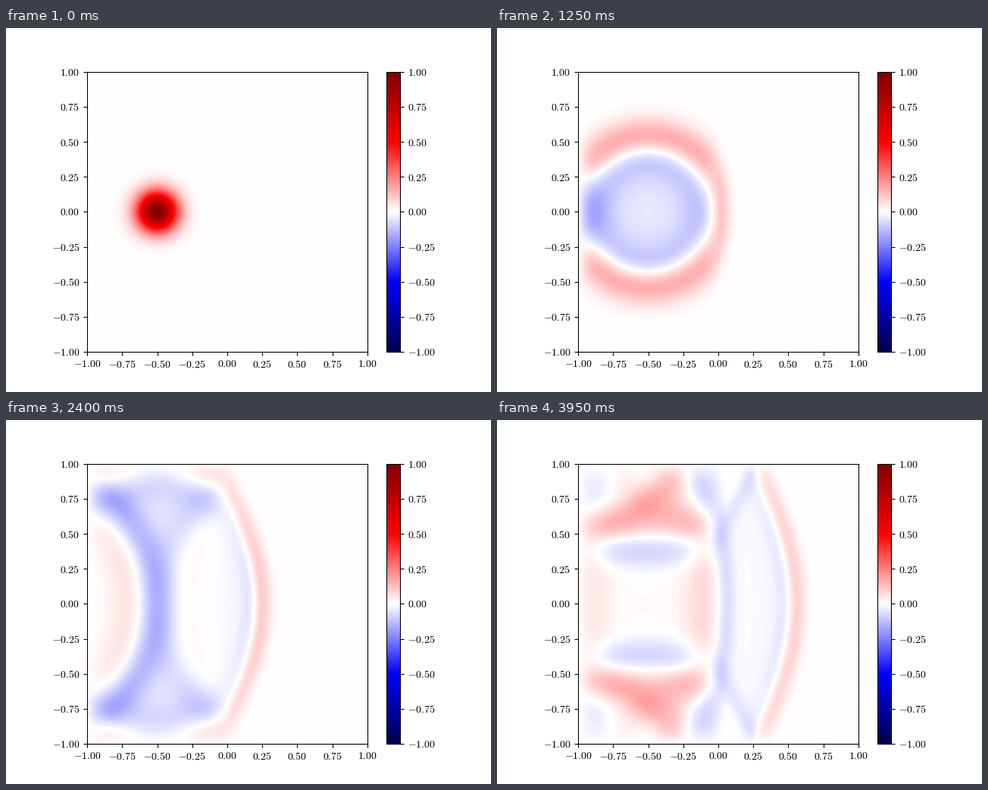
Animation of 640x480 px, one loop 4000 ms. Source, as a matplotlib script:

```python
import numpy as np
import matplotlib.pyplot as plt
from matplotlib.animation import FuncAnimation

plt.rcParams.update({
    "mathtext.fontset": "cm",
    "font.family": "Liberation Serif",
    "font.size": 10,
})

FRAMES = 80
INTERVAL = 50       # ms
N = 201             # grid nodes per side
SUBSTEPS = 4
DT = 0.02 / SUBSTEPS

axis = np.linspace(-1, 1, N)
h = axis[1] - axis[0]
X, Y = np.meshgrid(axis, axis)

# Wave speed 1 on the left, 1/2 on the right; averaged on the interface.
speed2 = np.where(X < -h / 2, 1.0, np.where(X > h / 2, 0.25, 0.4))
coef = (speed2 * (DT / h) ** 2)[1:-1, 1:-1]


def push(u):
    """Return dt^2 c^2 laplacian(u), zero on the fixed boundary."""
    out = np.zeros_like(u)
    out[1:-1, 1:-1] = coef * (
        u[2:, 1:-1] + u[:-2, 1:-1] + u[1:-1, 2:] + u[1:-1, :-2]
        - 4 * u[1:-1, 1:-1]
    )
    return out


def solve():
    """Leapfrog solution of the wave equation, one field per frame."""
    u = np.exp(-50 * ((X + 0.5) ** 2 + Y ** 2))
    u[[0, -1], :] = 0
    u[:, [0, -1]] = 0
    prev = u + push(u) / 2      # starts at rest
    fields = [u]
    for _ in range(FRAMES - 1):
        for _ in range(SUBSTEPS):
            u, prev = 2 * u - prev + push(u), u
        fields.append(u)
    return fields


def label(value, _):
    return f"${round(value, 2) + 0.0:.2f}$"


fields = solve()

fig, ax = plt.subplots(figsize=(6.4, 4.8), dpi=100)
edge = 1 + h / 2
image = ax.imshow(fields[0], origin="lower", cmap="seismic", vmin=-1, vmax=1,
                  extent=(-edge, edge, -edge, edge), interpolation="bilinear")
ticks = np.linspace(-1, 1, 9)
ax.set(xlim=(-1, 1), ylim=(-1, 1), xticks=ticks, yticks=ticks)
ax.xaxis.set_major_formatter(label)
ax.yaxis.set_major_formatter(label)
fig.colorbar(image, ax=ax, ticks=ticks, format=plt.FuncFormatter(label))


def update(i):
    image.set_data(fields[i])
    return (image,)


anim = FuncAnimation(fig, update, frames=FRAMES, interval=INTERVAL,
                     repeat=True, repeat_delay=0)
plt.show()
```
